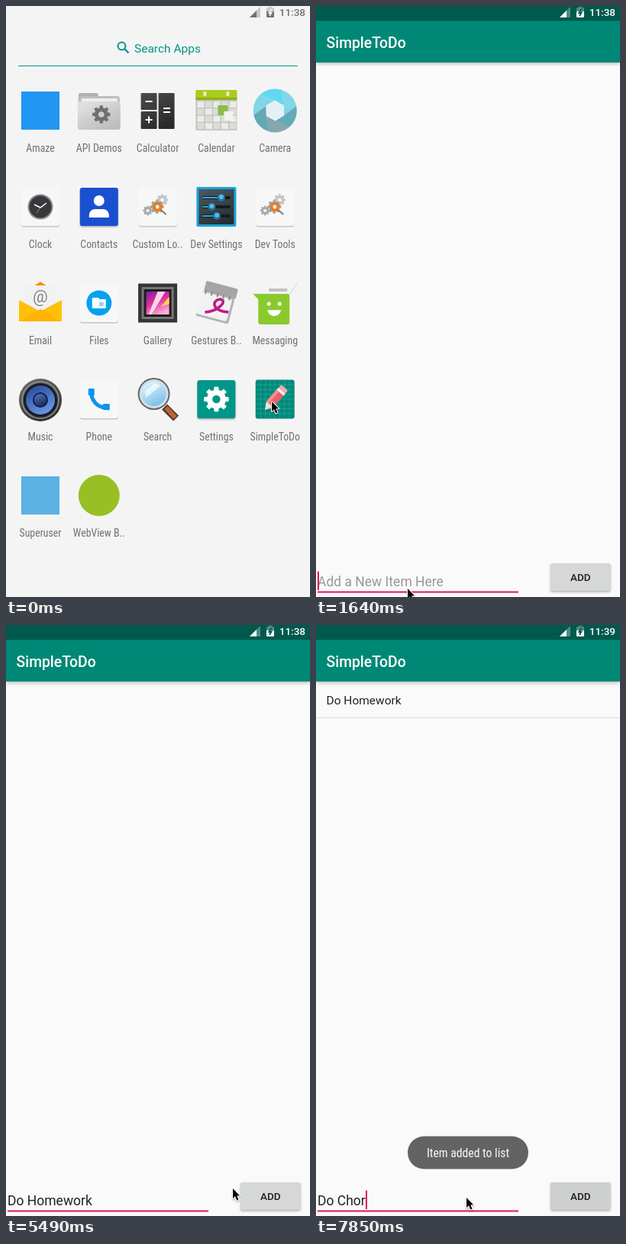
Animation of 398x774 px, one loop 8 s. Source, as an HTML page with a canvas:

```html
<!DOCTYPE html>
<html lang="en">
<head>
<meta charset="utf-8">
<title>SimpleToDo</title>
<style>
html, body { margin: 0; width: 398px; height: 774px; overflow: hidden; background: #f4f4f4; }
canvas { display: block; }
</style>
</head>
<body>
<canvas id="stage" width="398" height="774"></canvas>
<script>
const W = 398, H = 774, LOOP = 8000, STEP = LOOP / 54;
const g = document.getElementById('stage').getContext('2d');
const ACCENT = '#e01560', BAR = '#008877', BAR_DARK = '#00594d', TEAL = '#009688', PAGE = '#f4f4f4';
const SANS = 'Roboto, sans-serif', NARROW = '"Roboto Condensed", Roboto, sans-serif';

// Motion: n counts screen refreshes of STEP ms
const PRESSED = 39, ADDED = 40;
const clamp = x => Math.min(1, Math.max(0, x));
const easeOut = (x, power) => 1 - (1 - clamp(x)) ** power;
const reveal = n => easeOut((n - 2.95) / 2.05, 3);
const toastAlpha = n => easeOut((n - ADDED) / 4, 2);

const stops = [[5, 348, 518], [8, 120, 763], [33, 120, 763], [37, 297, 738], [PRESSED, 342, 748], [42, 206, 750], [44, 197, 750]];
function pointerAt(n) {
  let [, x, y] = stops[0];
  for (let i = 1; i < stops.length; i++) {
    const start = stops[i - 1][0], [end, toX, toY] = stops[i];
    const k = easeOut((n - start) / (end - start), 1.4);
    x += (toX - x) * k;
    y += (toY - y) * k;
  }
  return [x, y];
}

// Keys pressed per refresh, parted by bars; "<" deletes
const firstKeys = 'D|o| ||||Ho|mw|||||<|e|w|o|||r|k';
const nextKeys = 'Do ||C|h|o|r';
function press(keys, count) {
  let str = '';
  for (const key of keys.split('|').slice(0, Math.max(0, count)).join(''))
    str = key === '<' ? str.slice(0, -1) : str + key;
  return str;
}
const entryText = n => n < ADDED ? press(firstKeys, n - 12) : press(nextKeys, n - 47);
const blinks = [[8, 11], [23, 25], [35, 38]];
const caretOn = n => n > 3 && !blinks.some(([off, on]) => n >= off && n < on);

// Drawing helpers
function box(color, x, y, w, h, r = 0) {
  g.fillStyle = color;
  g.beginPath();
  g.roundRect(x, y, w, h, r);
  g.fill();
}
function square(color, size, r = 0) {
  box(color, -size / 2, -size / 2, size, size, r);
}
function disc(color, x, y, r) {
  g.fillStyle = color;
  g.beginPath();
  g.arc(x, y, r, 0, 7);
  g.fill();
}
function trace(points) {
  g.beginPath();
  for (let i = 0; i < points.length; i += 2) g.lineTo(points[i], points[i + 1]);
}
function poly(color, ...points) {
  g.fillStyle = color;
  trace(points);
  g.fill();
}
function line(color, width, ...points) {
  g.strokeStyle = color;
  g.lineWidth = width;
  trace(points);
  g.stroke();
}
function ring(color, width, x, y, r) {
  g.strokeStyle = color;
  g.lineWidth = width;
  g.beginPath();
  g.arc(x, y, r, 0, 7);
  g.stroke();
}
function text(str, x, y, font, color, align = 'left') {
  g.font = font;
  g.fillStyle = color;
  g.textAlign = align;
  g.fillText(str, x, y);
}
function raised(blur, draw) {
  g.save();
  g.shadowColor = 'rgba(0,0,0,.3)';
  g.shadowBlur = blur;
  g.shadowOffsetY = 1.5;
  draw();
  g.restore();
}
function fade(y1, y2, ...colors) {
  const f = g.createLinearGradient(y1 / 2, y1, y2 / 2, y2);
  colors.forEach((c, i) => f.addColorStop(i / (colors.length - 1), c));
  return f;
}
function turned(angle, x, y, draw) {
  g.save();
  g.translate(x, y);
  g.rotate(angle);
  draw();
  g.restore();
}
function gear(color, x, y, r, hole) {
  for (let i = 0; i < 8; i++)
    turned(i * Math.PI / 4, x, y, () => box(color, -r * .24, -r * 1.3, r * .48, r, 1));
  disc(color, x, y, r);
  disc(hole, x, y, r * .42);
}
// Largest size at which the condensed face keeps within a width
function narrow(sample, width, size) {
  const font = s => `condensed ${s}px ${NARROW}`;
  for (; size > 9; size -= .1) {
    g.font = font(size);
    if (g.measureText(sample).width <= width) break;
  }
  return font(size);
}
const labelFont = narrow('Dev Settings', 68.5, 14);
const toastFont = narrow('Item added to list', 108.5, 15.7);

// Icons, each centred on 0,0
function card() {
  box('#c6c6c6', -25, 18, 50, 8.5, 3);
  box('#f7f7f7', -25, -25, 50, 50, 3);
}
function tile(color) {
  raised(2, () => square(color, 50, 3));
}
function gears() {
  card();
  gear('#c4c4c4', 6, -9, 6, PAGE);
  gear('#aaa', -13, 5, 5, PAGE);
  gear('#a2a2a2', -1, 0, 7, '#eee');
  ring('#ee7a16', 3.5, 0, 0, 4.5);
  line('#777', 2, 4, 4, 11, 10);
}
function folder() {
  box('#b0b0b0', -27, -23, 26, 14, 3);
  box('#bdbdbd', -27, -19, 54, 43, 3);
  box('#eee', -23, -16, 47, 8);
  box(fade(-13, 25, '#dedede', '#bdbdbd'), -28, -12, 56, 37, 3);
  gear('#707070', 3, 5, 9, '#cfcfcf');
}
function calculator() {
  const tone = fade(-23, 24, '#484848', '#282828');
  box(tone, -22, -23, 21, 22, 1);
  box(tone, -22, 1, 21, 23, 1);
  box(tone, 1, -23, 21, 47, 1);
  for (const [x, y] of [[-11.5, -12], [-11.5, 12], [12, -3], [12, 2]]) line('#fff', 2, x - 4.5, y, x + 4.5, y);
  line('#fff', 2, -11.5, 7.5, -11.5, 16.5);
}
function calendar() {
  box('#c4c4c0', -27, -24, 54, 50, 1);
  for (let i = 0; i < 20; i++)
    box(i % 2 ? '#dcdcd8' : '#ebebe7', -25 + i % 5 * 10.5, -12 + Math.floor(i / 5) * 9.4, 9, 8);
  box('#a9cc1c', -27, -27, 54, 12, 1);
  box('#8fb113', -27, -17, 54, 3);
  for (const x of [-17, 13]) box('#e5eccc', x, -25, 4, 6, 1);
  box('#8dbd45', 2, -7, 13, 13);
  box('#f2f2ee', 10, 1, 12, 12);
}
function camera() {
  const turn = Math.PI / 3, hex = [];
  for (let i = 0; i < 6; i++) {
    const a = i * turn - 2.3, up = .5 - .5 * Math.sin(a + .7);
    g.fillStyle = `hsl(190, ${20 + 65 * up}%, ${52 + 14 * up + i % 2 * 8}%)`;
    g.beginPath();
    g.arc(0, 0, 28.5, a, a + turn + .02);
    g.lineTo(13 * Math.cos(a + 1.75), 13 * Math.sin(a + 1.75));
    g.lineTo(13 * Math.cos(a + .7), 13 * Math.sin(a + .7));
    g.fill();
    hex.push(13.5 * Math.cos(a + .7), 13.5 * Math.sin(a + .7));
  }
  poly('#e4f1f4', ...hex);
}
function clock() {
  card();
  disc('#8b8b8b', 0, 0, 16.5);
  disc('#37393d', 0, 0, 14.5);
  line('#fff', 1.5, -8, -3, 0, 1, 8, -5);
  line('#e57373', 1, 0, 1, -5, 8);
}
function contacts() {
  tile('#1a50d0');
  disc('#fff', 0, -8, 7);
  box('#fff', -13, 3, 26, 11, [8, 8, 0, 0]);
}
function sliders() {
  square('#18a5d6', 52, 2);
  square(fade(-23, 24, '#4a555d', '#262d32'), 46);
  for (let i = -1; i < 2; i++) {
    const x = 7 * Math.cos(i * 2.2 + 2.6), y = i * 12;
    line('#161b1e', 4, -18, y, 18, y);
    line('#28a9dc', 2, -18, y, x, y);
    disc('#1c75a3', x, y, 5);
    disc('#58b9e2', x, y - 1, 3);
  }
}
function email() {
  poly('#f39200', -9, -22, 0, -28, 9, -22);
  box('#f2f2f2', -22, -23, 44, 35);
  text('@', 0, -1, `22px ${SANS}`, '#858585', 'center');
  poly('#ffc107', -28, -4, 0, 11, 28, -4, 28, 24, -28, 24);
  poly('#ffb300', -28, 24, 0, 8, 28, 24);
}
function files() {
  card();
  disc('#03a2ee', 0, 0, 16.5);
  box('#fff', -9, -7, 9, 5, 1);
  box('#fff', -9, -5, 18, 12, 1);
  box('#8ed4f7', 0, -1, 6, 5);
}
function gallery() {
  square('#343434', 51);
  square('#777', 42);
  square('#1d1d1d', 36);
  square(fade(-18, 14, '#7b1fa2', '#e0309b', '#ffb3dc'), 30);
  poly('#fbd3ea', 0, -15, 10, -15, -8, 15, -12, 15);
  poly('#ffd54f', 4, 5, 15, -8, 15, 1);
}
function gestures() {
  turned(.26, 0, 0, () => {
    box('#a5a5a5', -20, -25, 43, 14, 2);
    box('#b4b4b4', -22, -11, 44, 34, 3);
    box('#f2f2f2', -23, -10, 42, 30, 3);
    for (let x = -17; x < 20; x += 8) line('#888', 2, x, -13, x, -8);
  });
  g.strokeStyle = '#c2188b';
  g.lineWidth = 3.5;
  g.beginPath();
  g.moveTo(-15, 12);
  g.bezierCurveTo(2, 11, 16, -3, 5, -5);
  g.bezierCurveTo(-6, -4, -7, 10, 16, 12);
  g.stroke();
}
function messaging() {
  line('#c2c2c2', 4, -8, -17, 16, -17);
  line('#d6d6d6', 1, 18, -10, 29, -26);
  box('#8bca2e', -22, -12, 41, 40, 3);
  poly('#8bca2e', -29, -12, -14, -12, -14, 3);
  for (const x of [-8, 6]) disc('#fff', x, 1, 2.5);
  g.fillStyle = '#fff';
  g.beginPath();
  g.arc(-1, 8, 9, .15, Math.PI - .15);
  g.fill();
}
function music() {
  disc(fade(-27, 28, '#6a6a6a', '#2c2c2c'), 0, 1, 28);
  ring('#909090', 1.5, 0, 1, 24);
  disc('#171b28', 0, 1, 22);
  disc(fade(-18, 20, '#2a4d9c', '#6d9bea'), 0, 1, 19);
  disc('#10204a', 0, 1, 10);
  disc(fade(-7, 9, '#4f73bd', '#15264f'), 0, 1, 8);
}
function phone() {
  card();
  g.strokeStyle = '#0a94ef';
  g.lineWidth = 5;
  g.beginPath();
  g.moveTo(-11, -13);
  g.quadraticCurveTo(-10, 11, 13, 12);
  g.stroke();
  box('#0a94ef', -14, -14, 8, 9, 1);
  box('#0a94ef', 5, 6, 9, 8, 1);
}
function magnifier() {
  line('#4a3a32', 10, 9, 10, 24, 25);
  line('#c0632c', 6, 11, 11, 23, 24);
  disc('#5b6670', -5, -7, 21);
  disc('#d7dde2', -5, -7, 19);
  disc(fade(-22, 10, '#d9f2ff', '#6ebbe4'), -5, -7, 16);
  poly('rgba(255,255,255,.65)', -17, -10, -4, -21, 4, -18, -15, -2);
}
function settings() {
  tile(TEAL);
  gear('#fff', 0, 0, 12.5, TEAL);
}
function pencil() {
  square('#00897b', 51, 3);
  for (let i = -19; i < 25; i += 6.3) {
    line('rgba(110,220,200,.25)', 1, i, -25, i, 25);
    line('rgba(110,220,200,.25)', 1, -25, i, 25, i);
  }
  turned(-.85, 0, -1, () => {
    poly('#f5e3cd', -20, 0, -10, -6, -10, 6);
    box('#ef5f68', -10, -6, 22, 12);
    box('#f58d93', -10, -6, 22, 4);
    box('#eee', 10, -6, 4, 12);
    box('#f7a8b1', 14, -6, 5, 12, 2);
  });
}
const apps = [
  ['Amaze', () => square('#2196f3', 50)], ['API Demos', folder],
  ['Calculator', calculator], ['Calendar', calendar], ['Camera', camera],
  ['Clock', clock], ['Contacts', contacts], ['Custom Lo..', gears],
  ['Dev Settings', sliders], ['Dev Tools', gears],
  ['Email', email], ['Files', files], ['Gallery', gallery],
  ['Gestures B..', gestures], ['Messaging', messaging],
  ['Music', music], ['Phone', phone], ['Search', magnifier],
  ['Settings', settings], ['SimpleToDo', pencil],
  ['Superuser', () => square('#5bb0e4', 50)],
  ['WebView B..', () => disc('#97c024', 0, 0, 27)]
];

function launcher() {
  box(PAGE, 0, 0, W, H);
  ring(TEAL, 2, 151.5, 52.5, 5);
  line(TEAL, 2.4, 155, 56, 160.5, 61.5);
  text('Search Apps', 168, 61, `15.5px ${SANS}`, TEAL);
  box(TEAL, 16, 78, 366, 1);
  apps.forEach(([name, icon], i) => {
    const x = 45 + (i % 5) * 76.8, y = 137 + Math.floor(i / 5) * 126;
    turned(0, x, y, icon);
    text(name, x, y + 53.5, labelFont, '#717171', 'center');
  });
}

function entry(n) {
  const str = entryText(n), font = `17.5px ${SANS}`;
  if (str) text(str, 2, 759.5, font, '#222');
  else text('Add a New Item Here', 2, 759.5, font, '#979797');
  box(ACCENT, 2, 766.5, 263, 2);
  g.font = font;
  const x = 2 + Math.round(g.measureText(str).width);
  if (caretOn(n)) box(ACCENT, x, 740.5, n < 5 ? 1 : 2, 24.5);
}

function app(n) {
  box('#fafafa', 0, 0, W, H);
  raised(5, () => box(BAR, 0, 19, W, 55));
  box(BAR_DARK, 0, 0, W, 19.5);
  text('SimpleToDo', 13.5, 54.5, `500 19.35px ${SANS}`, '#fff');
  if (n >= ADDED) {
    text('Do Homework', 13.5, 104, `15.5px ${SANS}`, '#222');
    box('#dadada', 0, 121, W, 1);
  }
  raised(3, () => box(n < PRESSED ? '#d6d7d7' : '#cecfcf', 307, 730, 78.5, 36, 2));
  text('ADD', 346.3, 753, `500 13.5px ${SANS}`, '#1f1f1f', 'center');
  entry(n);
}

// The window grows out of its icon while it slides up
function openApp(n, p) {
  const wide = clamp(p * 1.6), left = 327 * (1 - wide), top = Math.round(501 * (1 - p));
  g.save();
  g.beginPath();
  g.rect(left, top, 378 + 20 * wide - left, 552 + 222 * clamp(p * 1.15) - top);
  g.clip();
  g.globalAlpha = clamp(.25 + p);
  g.translate(0, Math.round(87 * (1 - p)));
  app(n);
  g.restore();
}

function statusBar(n, p) {
  const dark = p === 1;
  const ink = dark ? '#fff' : p > .5 ? '#9b9b9b' : '#717171';
  const pale = dark ? '#4d8b82' : '#c8c8c8';
  poly(pale, 319, 15, 333, 15, 333, 1);
  poly(ink, 319, 15, 328, 15, 328, 6);
  box(pale, 343.5, 1, 5, 3);
  box(pale, 341, 2.5, 10, 6);
  box(ink, 341, 7, 10, 8, 1);
  line(dark ? BAR_DARK : PAGE, 2, 347.5, 4, 344.5, 9, 347.5, 8.5, 345, 13);
  text(n < ADDED ? '11:38' : '11:39', 392, 13, `500 13.5px ${SANS}`, ink, 'right');
}

function toast(alpha) {
  if (!alpha) return;
  g.save();
  g.globalAlpha = alpha;
  box('#636363', 120, 669.5, 158, 43, 21.5);
  g.globalAlpha = Math.sqrt(alpha);
  text('Item added to list', 199, 697, toastFont, '#fafafa', 'center');
  g.restore();
}

function pointer(x, y) {
  turned(0, x, y, () => {
    const shape = [0, 0, 0, 13, 3, 10.3, 5.3, 15.5, 7.5, 14.5, 5.3, 9.5, 9, 9.2];
    g.lineJoin = 'round';
    raised(2, () => line('#fff', 2, ...shape, 0, 0));
    poly('#000', ...shape);
  });
}

function render(t) {
  const n = Math.floor((t + 5) / STEP), p = reveal(n);
  if (p < 1) launcher();
  if (p === 1) app(n);
  else if (p) openApp(n, p);
  statusBar(n, p);
  toast(toastAlpha(n));
  pointer(...pointerAt(n));
}

const begin = performance.now();
function tick() {
  render((performance.now() - begin) % LOOP);
  requestAnimationFrame(tick);
}
tick();
</script>
</body>
</html>
```
